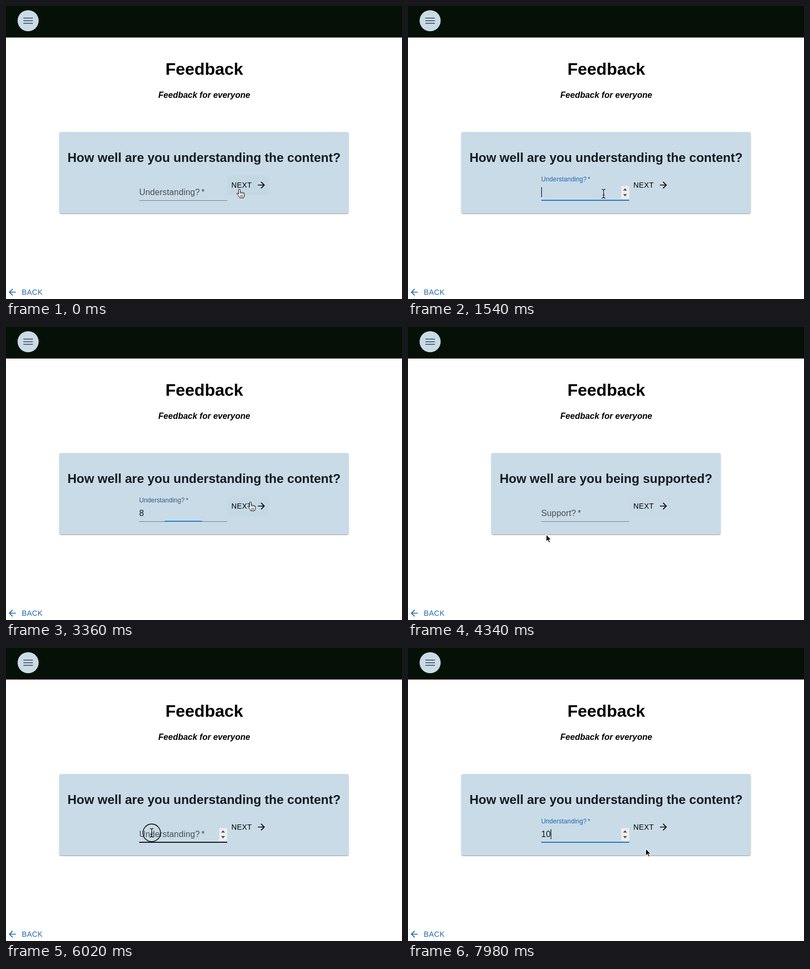
An HTML page for the animation above (8 s loop, 752 by 558 pixels).

```html
<!DOCTYPE html>
<html lang="en">
<head>
<meta charset="utf-8">
<title>Feedback</title>
<style>
  html, body { margin: 0; width: 100%; height: 100%; overflow: hidden; background: #fff; }
  body { font-family: "Liberation Sans", Arial, sans-serif; }
  svg { position: absolute; left: 0; top: 0; }
  text { white-space: pre; }
  #row { position: absolute; top: 240px; width: 752px; display: flex; justify-content: center; }
  #card {
    box-sizing: border-box; height: 155px; padding: 35px 16px 0; border-radius: 4px; background: #c9dbe7;
    box-shadow: 0 2px 1px -1px rgba(0,0,0,.2), 0 1px 1px rgba(0,0,0,.14), 0 1px 3px rgba(0,0,0,.12);
  }
  h2 { margin: 0; font-size: 24px; line-height: 28px; white-space: nowrap; color: #111c21; }
  .title { font-weight: bold; text-anchor: middle; }
  .button { font-size: 14px; letter-spacing: .4px; }
  .field { font-size: 16px; letter-spacing: .15px; }
</style>
</head>
<body>
<div id="row"><div id="card"><h2 id="question"></h2></div></div>
<svg width="752" height="558" viewBox="0 0 752 558">
  <defs>
    <path id="forward" d="M12 4l-1.41 1.41L16.17 11H4v2h12.17l-5.58 5.59L12 20l8-8z"/>
    <path id="beamShape" d="M-3.5 -8.3Q-.5 -8.3 0 -6.8Q.5 -8.3 3.5 -8.3M0 -6.8V6.8M-3.5 8.3Q-.5 8.3 0 6.8Q.5 8.3 3.5 8.3M-2 2.5H2"/>
  </defs>
  <rect width="752" height="60" fill="#051007"/>
  <rect y="57" width="752" height="3" fill="#000"/>
  <circle cx="42" cy="28" r="20" fill="#c9dbe7"/>
  <path d="M33 22h18v2H33zM33 27h18v2H33zM33 32h18v2H33z" fill="#5d6b73"/>

  <text class="title" x="376.5" y="131" font-size="32">Feedback</text>
  <text class="title" x="376.5" y="175" font-size="16" font-style="italic">Feedback for everyone</text>

  <rect id="nextHover" x="420" y="322.5" width="79" height="38" rx="4" fill="#c4d8e4"/>
  <text class="button" x="428" y="346">NEXT</text>
  <use href="#forward" transform="translate(475 331) scale(.8333)"/>

  <rect id="backHover" x="-6" y="529" width="83" height="36" rx="4" fill="#f3fbfe"/>
  <g fill="#1c67ae">
    <text class="button" x="30" y="549.5">BACK</text>
    <use href="#forward" transform="translate(22 535) scale(-.8333 .8333)"/>
  </g>

  <g id="label"><text class="field"><tspan id="labelText"></tspan><tspan dx="3">*</tspan></text></g>
  <text class="field" id="value" x="253" y="360" fill="#0c1317"></text>
  <rect id="caret" y="345" width="1.2" height="19" fill="#0c1317"/>
  <g id="spinner">
    <rect x="405" y="343" width="15" height="24" rx="1" fill="#efefef"/>
    <path d="M408.5 351.5l3.7-4.2 3.7 4.2zM408.5 358.3l3.7 4.2 3.7-4.2z" fill="#4a4a4a"/>
  </g>
  <rect id="line" x="253" width="167"/>
  <rect id="focusLine" y="369" height="2" fill="#2479c3"/>

  <circle id="press" r="16.7" fill="none" stroke="#000" stroke-width="1.4"/>
  <path id="arrow" d="M0 0V13.8L3.2 10.9 5.3 15.8 7.7 14.8 5.6 10H9.8Z" stroke="#fff" stroke-width="1.1"/>
  <g id="hand" stroke="#000" stroke-linejoin="round" stroke-linecap="round">
    <path d="M-1.5 8.5V.5a1.6 1.6 0 0 1 3.2 0V5.4c.3-1.2 2.8-1.1 3 .3c.6-1 2.6-.8 2.8.6c.9-.8 2.3-.2 2.3 1.2v3c0 2.6-1.6 3-1.7 5H.8c0-1.6-2-3-3-4.8-1-1.6-2.6-2.6-2.4-3.7.4-1.2 2.2-.7 3.1 1.5z" fill="#fff"/>
    <path d="M1.7 5.4v2.4M4.7 5.8v2.2M7.5 6.5v1.8M2.2 10.5v3M4.4 10.5v3M6.6 10.5v3" fill="none" stroke-width=".8"/>
  </g>
  <g id="beam" fill="none">
    <use href="#beamShape" stroke="#fff" stroke-opacity=".6" stroke-width="2.4"/>
    <use href="#beamShape" stroke="#000" stroke-width="1.2"/>
  </g>
</svg>
<script>
const LOOP = 8000, STEP = 70, EASE_MS = 200, BLINK = 510;
const $ = id => document.getElementById(id);
const set = (id, attrs) => { for (const k in attrs) $(id).setAttribute(k, attrs[k]); };
const show = (id, on) => { $(id).style.display = on ? "" : "none"; };
const lastBefore = (list, t) => list.filter(e => e.at < t).pop();

// Pointer rests and the curves between them; bend holds the Bezier handles
const home = [443, 350], field = [371.5, 357.5], next = [464, 334.5], corner = [36, 534],
  back = [36.5, 543], label = [276.7, 352], inside = [308, 358];
const moves = [
  { at: 0, end: 350, from: home, to: field },
  { at: 2520, end: 3290, from: field, to: next, bend: [[500, 480], [605, 218]] },
  { at: 3920, end: 4760, from: next, to: corner, bend: [[400, 345], [133, 419]] },
  { at: 4760, end: 5180, from: corner, to: back, bend: [[10, 505], [2, 560]] },
  { at: 5460, end: 5950, from: back, to: label },
  { at: 7140, end: 7280, from: label, to: inside },
  { at: 7560, end: 7980, from: inside, to: [451.5, 382], bend: [[340, 400], [400, 424]] }
];
const inputs = [
  { at: 520, value: "" }, { at: 2080, value: "8" }, { at: 3420, value: "" },
  { at: 6060, value: "" }, { at: 6640, value: "1" }, { at: 6700, value: "10" }
];
const presses = [490, 3290, 5320, 6020];
const areas = {
  next: [420, 323, 499, 361],
  field: [253, 343, 420, 371],
  back: [0, 529, 77, 558]
};

function pointer(t) {
  const move = lastBefore(moves, t);
  if (!move) return home;
  const { at, end, from, to, bend = [from, to] } = move;
  const k = Math.min(1, (t - at) / (end - at));
  const s = k * k * (3 - 2 * k), r = 1 - s;
  return [0, 1].map(i => r ** 3 * from[i] + 3 * r * r * s * bend[0][i] + 3 * r * s * s * bend[1][i] + s ** 3 * to[i]);
}

function over(name, t) {
  const [x, y] = pointer(t), [l, top, r, b] = areas[name];
  return x >= l && x <= r && y >= top && y <= b;
}

function hoverFade(name, t) {
  let hits = 0;
  for (let i = 0; i < 4; i++) hits += over(name, t - i * STEP);
  return hits / 4;
}

// The pointer hides after typing until it moves again
function pointerHidden(t) {
  const input = lastBefore(inputs, t);
  return Boolean(input && input.value) && input.at > lastBefore(moves, t).at;
}

// cubic-bezier(0, 0, .2, 1) over EASE_MS
function ease(t, start) {
  const x = Math.min(1, Math.max(0, (t - start) / EASE_MS));
  let lo = 0, hi = 1;
  for (let i = 0; i < 20; i++) {
    const s = (lo + hi) / 2;
    if (.6 * (1 - s) * s * s + s ** 3 < x) lo = s; else hi = s;
  }
  return 3 * (1 - lo) * lo * lo + lo ** 3;
}

function mix(a, b, k) {
  return "rgb(" + a.map((v, i) => Math.round(v + (b[i] - v) * k)) + ")";
}

function drawForm(t) {
  const support = t >= 3430 && t < 5460;
  $("question").textContent = support ? "How well are you being supported?" : "How well are you understanding the content?";
  $("labelText").textContent = support ? "Support?" : "Understanding?";

  const focused = t >= 500 && t < 3310 || t >= 6030;
  const refocus = ease(t, 6030);
  const shrink = ease(t, 500) - ease(t, 3420) + refocus;
  const tint = ease(t, 500) - ease(t, 3310) + refocus;
  set("label", {
    transform: `translate(253 ${360 - 25.7 * shrink}) scale(${1 - .25 * shrink})`,
    fill: mix([68, 78, 84], [28, 103, 180], tint)
  });

  const input = lastBefore(inputs, t);
  const value = input ? input.value : "";
  $("value").textContent = value;
  set("caret", { x: 253 + 8.95 * value.length });
  show("caret", focused && input && Math.floor((t - input.at) / BLINK) % 2 === 0);

  const hovered = over("field", t) && !pointerHidden(t);
  show("spinner", hovered || focused);
  set("line", {
    y: hovered ? 369 : 370,
    height: hovered ? 2 : 1,
    fill: hovered ? "#1a1c1e" : "#747f86"
  });
  set("focusLine", { x: 336.5 - 83.5 * tint, width: 167 * tint });
}

function drawPointer(t) {
  const [x, y] = pointer(t);
  const kind = over("next", t) || over("back", t) ? "hand" : over("field", t) ? "beam" : "arrow";
  const visible = !pointerHidden(t);
  for (const id of ["arrow", "hand", "beam"]) {
    show(id, visible && id === kind);
    set(id, { transform: `translate(${x} ${y})` });
  }
  set("press", { cx: x, cy: y });
  show("press", presses.includes(t));
  set("nextHover", { opacity: hoverFade("next", t) });
  set("backHover", { opacity: hoverFade("back", t) });
}

const start = performance.now();
function frame() {
  const elapsed = (performance.now() - start) % LOOP;
  const t = Math.floor(elapsed / STEP) * STEP;
  drawForm(t);
  drawPointer(t);
  requestAnimationFrame(frame);
}
frame();
</script>
</body>
</html>
```
